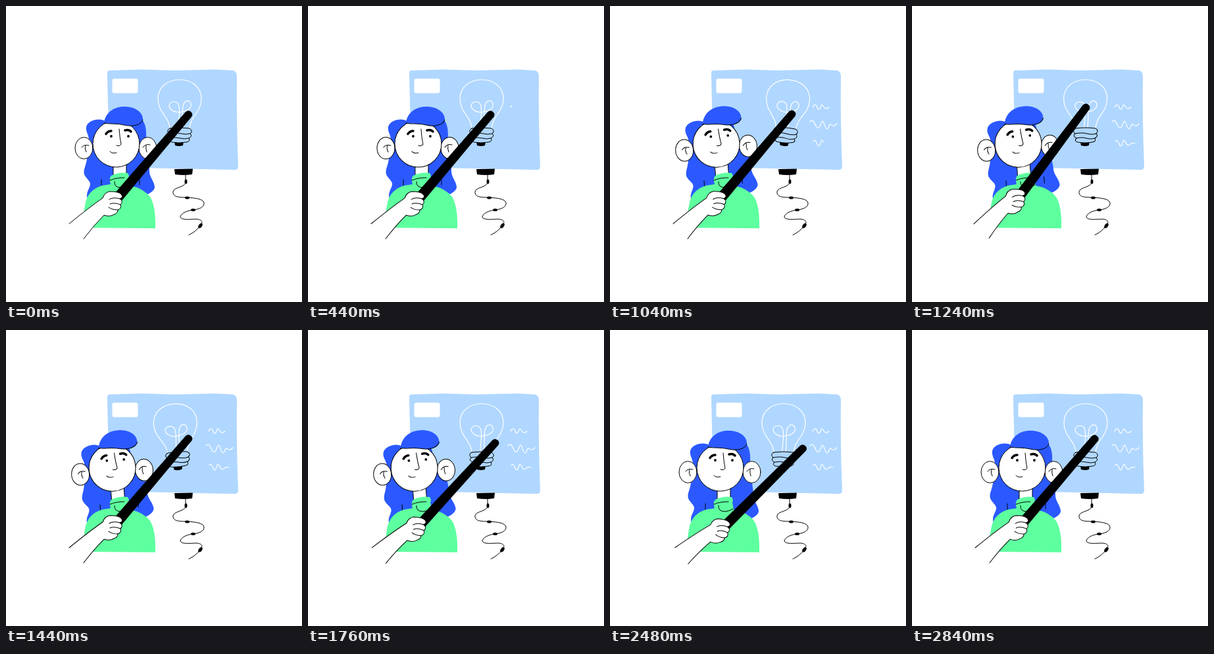
An HTML page for the animation above (2.88 s loop, 450 by 450 pixels).

```html
<!DOCTYPE html>
<html lang="en">
<head>
<meta charset="utf-8">
<title>Presenter</title>
<style>
  html, body { margin: 0; width: 100%; height: 100%; overflow: hidden; background: #fff; }
  svg { display: block; width: 100vw; height: 100vh; }
  .line { fill: none; stroke: #000; stroke-width: 1; stroke-linecap: round; stroke-linejoin: round; }
  .chalk { stroke: #fff; stroke-width: 1.2; }
  .white { fill: #fff; }
  .hair { fill: #2b59ff; }
  .shirt { fill: #5eff9f; }
  .board { fill: #b0d7ff; }
  .brow { stroke-width: 3.5; }
</style>
</head>
<body>
<svg viewBox="0 0 450 450">
  <!-- board and cable -->
  <path class="board" d="M154 103Q153 98 158 98L207 96.500L255 98L318 96.500L345 98Q350 99 351 105Q350 170 353 244Q353 250 346 249L200 246Q160 243 158 240Q155 160 154 103Z"/>
  <rect class="white" x="161.500" y="110.500" width="39" height="22" rx="3"/>
  <path d="M256 248L284 247.500L283 256Q270 258 257 256Z"/>
  <path class="line" d="M273 256V268C272 276 256 275 254 282C253 291 264 291 275 291C288 292 299 293 301 299C302 306 293 309 285 310C274 311 265 316 265 321C267 326 280 324 290 324C300 325 299 330 295 334Q289 343 278 348"/>
  <ellipse cx="273.500" cy="267" rx="2" ry="3.500"/>
  <ellipse cx="275.500" cy="291.500" rx="3.500" ry="2"/>
  <ellipse cx="284.500" cy="310" rx="3.500" ry="2"/>
  <ellipse cx="295.500" cy="334" rx="2.500" ry="4.200" transform="rotate(35 295.500 334)"/>

  <!-- notes -->
  <g class="line chalk">
    <path class="note" pathLength="1" d="M308 154C311 148 314 150 315 154C317 160 320 156 321 151C323 148 325 156 328 156Q331 156 333 154"/>
    <path class="note" pathLength="1" d="M304 176C309 170 311 179 314 184C318 189 320 180 322 176C325 171 326 186 330 187C333 187 332 179 336 180C339 184 342 182 345 179"/>
    <path class="note" pathLength="1" d="M309 206C313 200 314 211 317 213C320 213 320 206 322 204C325 204 325 212 329 212C332 212 332 206 339 209"/>
  </g>

  <g id="bulb">
    <path class="line chalk" d="M249 187C249 169 231 162 231 141C231 123 246 112 264 112C282 112 297 123 297 141C297 161 280 168 279 187"/>
    <path class="line chalk" d="M262 186C262 172 265 165 263 152C261 143 250 144 248 151C248 158 258 163 266 161C276 160 283 155 281 148C278 142 271 143 269 152C267 164 269 172 267 186"/>
    <path d="M256 206H270L269 212Q263 214 257 212Z"/>
    <g class="line">
      <path class="board" d="M249 186Q264 184 279 186Q285 190 280 194Q284 198 278 201Q281 206 274 207Q263 209 252 207Q246 205 250 201Q244 198 248 194Q243 189 249 186Z"/>
      <path d="M248 194Q258 192 266 194T280 194M250 201Q258 199 265 201T278 201"/>
    </g>
  </g>

  <g id="head">
    <path id="hair" class="hair"/>
    <path class="line" d="M145 264V273M203 262V272"/>
    <path class="white" d="M163 235V270H183V235Z"/>
    <path class="line" d="M163 238V262M183 238V262"/>
    <g class="line">
      <ellipse class="white" cx="118.500" cy="216" rx="13.500" ry="16.500"/>
      <ellipse class="white" cx="215.500" cy="216" rx="13.500" ry="16.500"/>
      <circle class="white" cx="167.500" cy="209.500" r="35.500"/>
    </g>
    <path class="line" d="M115 215Q118 210 126 212M121 212Q119 217 122 222M208 215Q212 209 219 211M213 212Q212 217 214 222"/>
    <path class="hair" d="M149 177C152 160 166 153 180 153C198 153 209 163 208 173C206 181 193 184 180 181C168 178 158 180 149 178Z"/>
    <path class="line" d="M208 173C206 181 193 184 180 181C168 178 158 180 149 178"/>
    <path class="line brow" d="M152 194.500Q155 190 160 190M181 189Q187 187.500 190 191"/>
    <circle cx="160" cy="198" r="1.900"/>
    <circle cx="186" cy="198" r="1.900"/>
    <path class="line" d="M172 187Q173 201 175 210Q173 214 168 212M158 221Q161 225 168 223"/>
  </g>

  <path class="shirt" d="M117 337Q117 317 121 298Q126 279 146 273L159 271Q156 262 160 258Q171 252 185 254Q188 258 186 262L188 273Q209 277 219 290Q228 305 227 338Z"/>
  <path class="line" d="M158 265Q167 261 180 261M165 267Q164 276 175 276Q183 275 187 272"/>

  <g id="arm">
    <path d="M164 286L273 161A6 6 0 0 1 282.500 168L176 296Z"/>
    <path class="line white" d="M96 331Q128 305 147 292Q150 283 158 282Q171 282 175 286Q179 291 173 293Q179 297 174 302Q176 308 170 310Q170 315 164 317Q158 321 149 318Q133 334 118 354"/>
    <path class="line" d="M173 293Q163 290 157 294M174 302Q164 298 158 301M170 310Q161 310 156 306"/>
  </g>
</svg>
<style>
  .line.white, .line .white { fill: #fff; }
  .line .board { fill: #b0d7ff; }
</style>
<script>
const LOOP = 2880, BEAT = LOOP / 7;
const get = id => document.getElementById(id);
const arm = get('arm'), head = get('head'), hair = get('hair'), bulb = get('bulb');
const notes = document.querySelectorAll('.note');
const clamp = x => Math.min(1, Math.max(0, x));
const smooth = x => x * x * (3 - 2 * x);

// Eased value between keys placed on whole beats.
function keyed(values, beat) {
  const i = Math.floor(beat), from = values[i], to = values[i + 1];
  return from + (to - from) * smooth(beat - i);
}

function turn(el, angle, x, y) {
  el.setAttribute('transform', `rotate(${angle} ${x} ${y})`);
}

function draw(now) {
  const t = now % LOOP, beat = t / BEAT;
  turn(arm, keyed([0, 0, 3.8, -3.6, 3.6, -4.2, 4.7, 0], beat), 100, 365);

  const lean = keyed([0, 0, 1, 1, 1, 1, 0, 0], beat);
  turn(head, -4 * lean, 167, 294);
  const tuck = 16 * lean; // the far side of the hair slips behind the face
  hair.setAttribute('d', `M152 176C144 169 124 173 122 184C121 192 126 195 126 204L123 232
    C122 243 117 248 119 256C122 263 129 266 128 272C126 280 121 283 124 294L200 290
    C212 289 226 283 226 275C225 265 217 260 218 248L216 232L${213 - tuck} 202
    C${214 - tuck} 188 ${212 - tuck} 176 ${204 - tuck} 170Z`);

  const sway = clamp((beat - 2) / 2);
  turn(bulb, 4.2 * Math.sin(sway * 2 * Math.PI), 264, 232);

  notes.forEach((note, i) => {
    const shown = clamp((t - BEAT * (1 + i / 2)) / 360);
    note.style.visibility = shown ? 'visible' : 'hidden';
    note.style.strokeDasharray = `${shown} 2`;
  });
  requestAnimationFrame(draw);
}
draw(performance.now());
</script>
</body>
</html>
```
